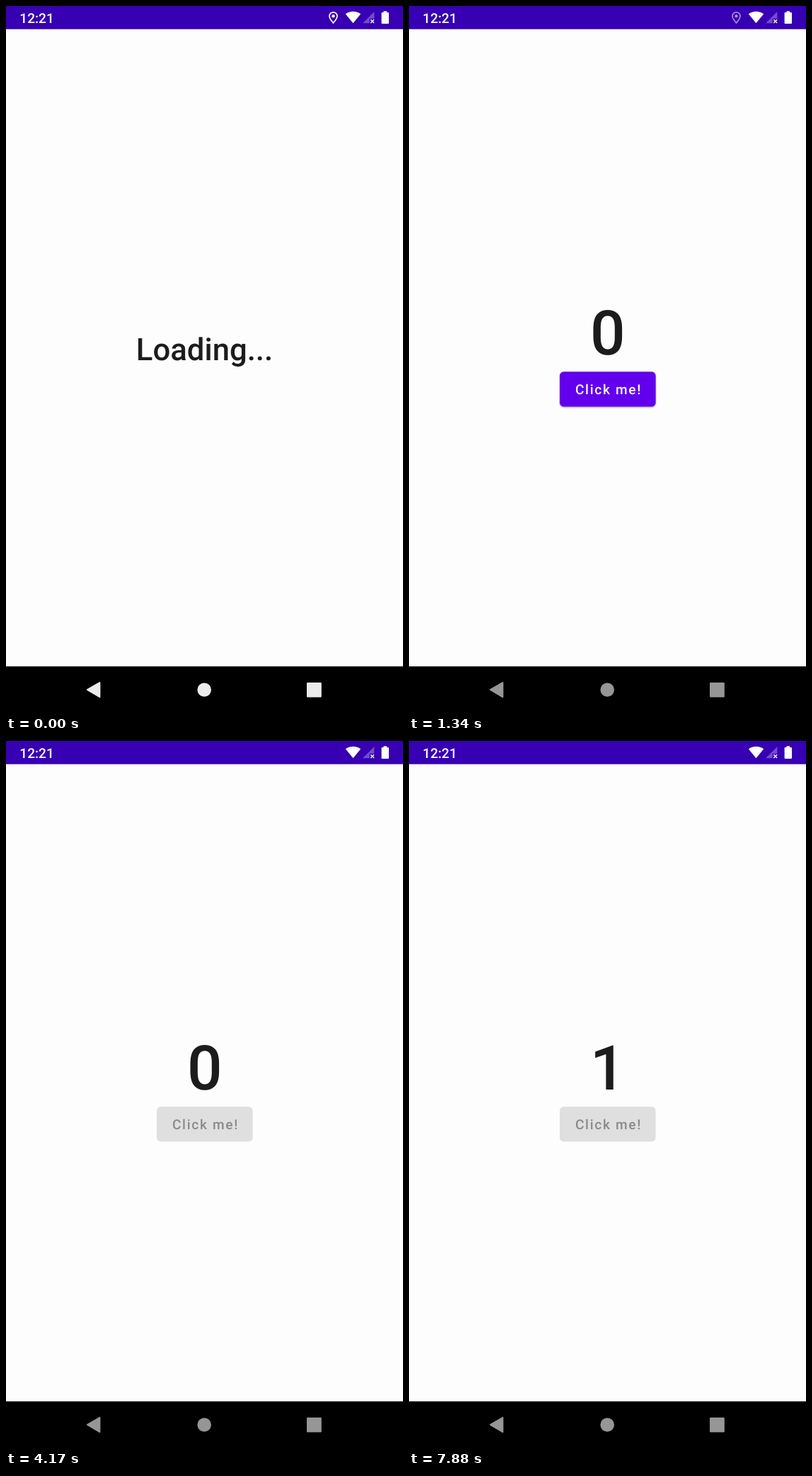
These frames come from a looping animation (561 px wide and 998 px high, 8 s). An HTML page:

```html
<!DOCTYPE html>
<html lang="en">
<head>
<meta charset="utf-8">
<title>Counter</title>
<style>
  html, body { margin: 0; width: 100%; height: 100%; overflow: hidden; background: #fdfdfd; }
  svg { display: block; width: 561px; height: 998px; }
  text { font-family: Roboto, sans-serif; font-weight: 500; text-rendering: geometricPrecision; }
</style>
</head>
<body>
<svg viewBox="0 0 561 998">
  <defs>
    <filter id="blur" x="-20%" y="-50%" width="140%" height="200%">
      <feGaussianBlur id="soft" stdDeviation="1.5"/>
    </filter>
  </defs>
  <rect width="561" height="998" fill="#fdfdfd"/>

  <!-- status bar -->
  <rect width="561" height="32.7" fill="#3700b3"/>
  <text x="19.3" y="23.8" font-size="19.1" fill="#fff">12:21</text>
  <g id="pin">
    <path d="M462.5 8.9c-3.1 0-5.5 2.4-5.5 5.4 0 3.6 3 6.6 5.5 9.6 2.5-3 5.5-6 5.5-9.6 0-3-2.4-5.4-5.5-5.4z" fill="none" stroke="#fff" stroke-width="1.7"/>
    <circle cx="462.5" cy="14.3" r="2.2" fill="#fff"/>
  </g>
  <path d="M490.5 24.3L479.8 11.2C482.7 9 486.4 7.8 490.5 7.8s7.8 1.2 10.7 3.4z" fill="#fff"/>
  <path d="M520.3 8v9.8h-6.6v6.5h-9.6z" fill="#fff" opacity=".3"/>
  <path d="M515.3 19.2l4.8 4.8m0-4.8l-4.8 4.8" stroke="#fff" stroke-width="1.4"/>
  <path d="M533.5 7.2h4.6v1.7h1.8q1.1 0 1.1 1.1v14q0 1.1-1.1 1.1h-8.2q-1.1 0-1.1-1.1v-14q0-1.1 1.1-1.1h1.8z" fill="#fff"/>

  <!-- content -->
  <text id="loading" x="280.5" y="500.4" font-size="43.64" text-anchor="middle" fill="#1c1c1c">Loading...</text>
  <g id="main">
    <text id="count" x="280.8" y="492.3" font-size="87.3" text-anchor="middle" fill="#1c1c1c">0</text>
    <rect id="shadow" x="213" y="516.3" width="135.6" height="49.1" rx="5.4" fill="#000" filter="url(#blur)"/>
    <rect id="button" x="213" y="516.3" width="135.6" height="49.1" rx="5.4"/>
    <rect id="ripple" x="213" y="516.3" width="135.6" height="49.1" rx="5.4" fill="#fff"/>
    <text id="label" x="234.9" y="548.3" font-size="19.1" letter-spacing="1.7">Click me!</text>
  </g>

  <!-- navigation bar -->
  <rect y="932.2" width="561" height="66" fill="#000"/>
  <g id="nav" stroke-width="2" stroke-linejoin="round">
    <path d="M115 965.2L132.4 955v20.4z"/>
    <circle cx="280.2" cy="965.2" r="8.8"/>
    <rect x="426" y="956" width="18.8" height="18.8"/>
  </g>
</svg>
<script>
const LOOP = 8000;
const NAV_FADE = 830, READY = 1200, PIN_OUT = 1250;
const CLICKS = [{ press: 2760, up: 2960, done: 5960 }, { press: 6760, up: 6960, done: LOOP }];
const REST = 2, HELD = 8;

const $ = id => document.getElementById(id);
const set = (id, attrs) => { for (const k in attrs) $(id).setAttribute(k, attrs[k]); };
const ramp = (t, from, len) => Math.min(1, Math.max(0, (t - from) / len));
const ease = p => p * p * (3 - 2 * p);
const mix = (a, b, p) => a + (b - a) * p;

function buttonState(t) {
  const s = { enabled: true, lift: REST, ripple: 0, count: 0 };
  for (const c of CLICKS) {
    if (t >= c.done) {
      s.count++;
      s.lift = REST * ramp(t, c.done, 100);
    } else if (t >= c.up) {
      s.enabled = false;
      s.lift = mix(HELD, 0, ramp(t, c.up, 240));
    } else if (t >= c.press) {
      s.lift = mix(REST, HELD, ease(ramp(t, c.press, 120)));
      s.ripple = 0.24 * ramp(t, c.press, 200);
    }
  }
  return s;
}

function draw(t) {
  const gray = Math.round(mix(235, 150, ramp(t, 0, NAV_FADE)));
  const tone = `rgb(${gray},${gray},${gray})`;
  set('nav', { fill: tone, stroke: tone });
  set('pin', { opacity: 1 - ramp(t, PIN_OUT, 200) });
  set('loading', { visibility: t < READY ? 'visible' : 'hidden' });
  set('main', { visibility: t < READY ? 'hidden' : 'visible' });

  const b = buttonState(t);
  $('count').textContent = b.count;
  set('button', { fill: b.enabled ? '#6200ee' : '#dfdfdf' });
  set('label', { fill: b.enabled ? '#fff' : '#8a8a8a' });
  set('ripple', { opacity: b.ripple });
  set('shadow', { opacity: 0.34 * Math.min(1, b.lift / REST), y: 516.3 + b.lift * 0.65 });
  set('soft', { stdDeviation: 0.5 + b.lift * 0.4 });
}

const start = performance.now();
function tick(now) {
  draw(Math.max(0, now - start) % LOOP);
  requestAnimationFrame(tick);
}
draw(0);
requestAnimationFrame(tick);
</script>
</body>
</html>
```
